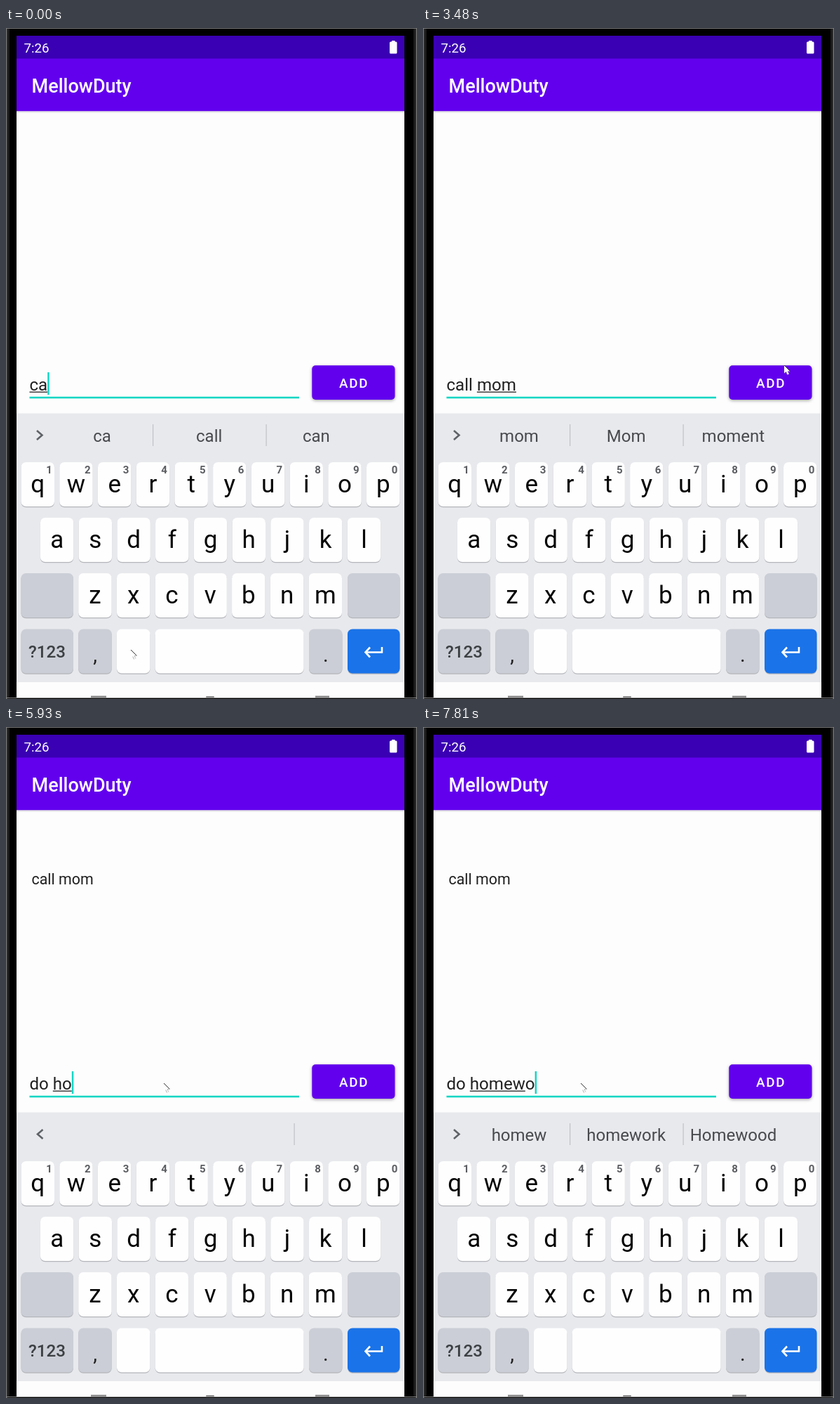
Write an HTML page with a canvas that moves like this. It is 586x955 px and loops after 8 s.

```html
<!DOCTYPE html>
<html lang="en">
<head>
<meta charset="utf-8">
<title>To-do list</title>
<style>
  html, body { margin: 0; width: 100%; height: 100%; overflow: hidden; background: #000; }
  canvas { display: block; }
</style>
</head>
<body>
<canvas id="stage" width="586" height="955"></canvas>
<script>
const ctx = document.getElementById('stage').getContext('2d');
const LOOP = 8000, BLINK = 530, CLICK = 3760, INPUT_X = 33.5;
const PURPLE = '#6200ee', TEAL = '#14d6c4', KEY = '#fefefe', GREY_KEY = '#cbced6';

// [time, text, underline start, underline end, suggestions (empty: toolbar)]
const steps = [
  [0, 'ca', 0, 2, 'ca call can'],
  [270, 'cal', 0, 2, 'ca call can'],
  [420, 'cal', 0, 3, 'cal call called'],
  [850, 'call', 0, 4, 'call Call calling'],
  [1130, 'call ', 0, 0, 'mom me brother'],
  [1280, 'call m', 0, 0, 'mom me brother'],
  [1420, 'call mo', 5, 6, 'm mom my'],
  [1550, 'call mo', 5, 7, 'mo no more'],
  [1680, 'call mom', 5, 7, 'mo no more'],
  [1960, 'call mom', 5, 8, 'mom Mom moment'],
  [3890, '', 0, 0, 'mom Mom moment'],
  [4030, '', 0, 0, ''],
  [4960, 'd', 0, 0, ''],
  [5110, 'd', 0, 1, 'd do did'],
  [5240, 'do', 0, 1, 'd do did'],
  [5380, 'do', 0, 2, "do dog don't"],
  [5520, 'do ', 0, 0, ''],
  [5650, 'do h', 0, 0, ''],
  [5780, 'do h', 3, 4, ''],
  [5930, 'do ho', 3, 5, ''],
  [6200, 'do ho', 3, 5, 'h he home'],
  [6340, 'do ho', 3, 5, 'ho go hope'],
  [6980, 'do hom', 3, 5, 'ho go hope'],
  [7260, 'do hom', 3, 6, 'hom home him'],
  [7400, 'do home', 3, 6, 'hom home him'],
  [7540, 'do home', 3, 7, 'home Home homes'],
  [7670, 'do homew', 3, 8, 'homew homework Homewood'],
  [7810, 'do homewo', 3, 8, 'homew homework Homewood']
];

// [time, x, y] of the pointer tip
const pointerPath = [
  [0, 178, 885], [2110, 178, 885], [3080, 541, 472], [3340, 515, 480],
  [3480, 509, 481.5], [3760, 509, 481.5], [4560, 225, 507], [LOOP, 225, 507]
];

function rect(x, y, w, h, color) {
  ctx.fillStyle = color;
  ctx.fillRect(x, y, w, h);
}

function round(x, y, w, h, r, color) {
  ctx.fillStyle = color;
  ctx.beginPath();
  ctx.roundRect(x, y, w, h, r);
  ctx.fill();
}

function line(points, color, width) {
  ctx.strokeStyle = color;
  ctx.lineWidth = width;
  ctx.beginPath();
  points.forEach(([x, y]) => ctx.lineTo(x, y));
  ctx.stroke();
}

function setFont(size, weight = 400) {
  ctx.font = `${weight} ${size}px Roboto, sans-serif`;
}

function text(str, x, y, size, color, align = 'left', weight = 400) {
  setFont(size, weight);
  ctx.textAlign = align;
  ctx.fillStyle = color;
  ctx.fillText(str, x, y);
}

function key(x, y, w, color, label = '', baseline = 43) {
  round(x, y + 1.2, w, 63, 7, '#b3b5ba');
  round(x, y, w, 63, 7, color);
  text(label, x + w / 2, y + baseline, 35, '#050505', 'center');
}

function drawPhone() {
  rect(0, 0, 586, 955, '#000');
  rect(0, 0, 586, 1, '#777');
  rect(0, 0, 1.5, 955, '#777');
  rect(584.5, 0, 1.5, 955, '#777');
  rect(2, 1, 3, 952, '#1c1c1c');
  rect(581, 1, 3, 952, '#1c1c1c');
  rect(15, 11, 553, 942, '#fdfdfd');
  rect(15, 11, 553, 33, '#3a00b3');
  rect(15, 43.5, 553, 75, PURPLE);
  rect(15, 118.5, 553, 1, '#c9c9cf');
  rect(15, 119.5, 553, 1.5, '#eeeef0');
  text('7:26', 25.5, 34.5, 18.7, '#fff');
  round(547, 19.5, 10.5, 17, 1.5, '#fff');
  rect(550, 18, 4.5, 2, '#fff');
  text('MellowDuty', 36.5, 91.5, 27, '#fff', 'left', 500);
  rect(121, 950.5, 22, 2.5, '#8a8a8a');
  rect(441, 950.5, 20, 2.5, '#8a8a8a');
  round(285, 951, 12, 2, 2, '#8a8a8a');
  rect(0, 953, 586, 1, '#888');
}

function drawKeyboard() {
  const pitch = 54.72, w = 47.5;
  const row = (letters, x, y) =>
    [...letters].forEach((c, i) => key(x + pitch * i, y, w, KEY, c));
  rect(15, 548.5, 553, 382.5, '#e8e9ed');
  row('qwertyuiop', 21.5, 618);
  [...'1234567890'].forEach((d, i) =>
    text(d, 61.5 + pitch * i, 634, 15, '#5a5c60', 'center', 700));
  row('asdfghjkl', 48.9, 697);
  row('zxcvbnm', 103.2, 776);
  key(21.5, 776, 74.5, GREY_KEY);
  key(487, 776, 74.5, GREY_KEY);
  key(21.5, 855.5, 74.5, GREY_KEY);
  text('?123', 58.5, 896, 24.2, '#3c4043', 'center', 500);
  key(103.2, 855.5, w, GREY_KEY);
  key(157.9, 855.5, w, KEY);
  key(212.6, 855.5, 212, KEY);
  key(432, 855.5, w, GREY_KEY);
  text(',', 127, 902, 29, '#222', 'center');
  text('.', 455.7, 902, 29, '#222', 'center');
  key(487, 855.5, 74.5, '#1a73e8');
  line([[536, 881], [536, 888.5], [513, 888.5]], '#fff', 2.6);
  line([[519, 881.5], [512.5, 888.5], [519, 895.5]], '#fff', 2.6);
}

function drawSuggestions(words) {
  const open = words !== '';
  const [back, tip] = open ? [44, 51.5] : [52.5, 45];
  line([[back, 573], [tip, 579.5], [back, 586]], '#5f6368', 2.6);
  (open ? [209, 370.5] : [410.5]).forEach(x => rect(x, 564, 1.2, 31, '#bfc1c6'));
  if (open) words.split(' ').forEach((word, i) =>
    text(word, 137 + 152.7 * i, 589, 24, '#484a4e', 'center'));
}

function drawInput(t, [, value, from, to]) {
  const edited = steps.find(step => step[1] === value)[0];
  const xAt = n => INPUT_X + ctx.measureText(value.slice(0, n)).width;
  text(value, INPUT_X, 515.5, 24.1, '#202020');
  if (to > from) rect(xAt(from), 517.5, xAt(to) - xAt(from), 1.3, '#222');
  rect(33.5, 524.7, 384.5, 2.6, TEAL);
  if (Math.floor((t - edited) / BLINK) % 2 === 0) rect(xAt(value.length), 490, 2.5, 32, TEAL);
}

function drawButton(t) {
  ctx.save();
  ctx.shadowColor = 'rgba(0,0,0,.35)';
  ctx.shadowBlur = 4;
  ctx.shadowOffsetY = 1.5;
  round(436.3, 480.3, 118.2, 48.7, 5, PURPLE);
  ctx.restore();
  const age = (t - CLICK) / 450;
  if (age >= 0 && age < 1) round(436.3, 480.3, 118.2, 48.7, 5, `rgba(255,255,255,${0.25 * (1 - age)})`);
  ctx.letterSpacing = '1.7px';
  text('ADD', 475, 512, 18.8, '#fff', 'left', 500);
  ctx.letterSpacing = '0px';
}

function drawPointer(t) {
  const tick = Math.floor((t - 2250) / 137) * 137 + 2250;
  const now = Math.max(0, tick);
  const i = Math.max(1, pointerPath.findIndex(p => p[0] > now));
  const [t0, x0, y0] = pointerPath[i - 1], [t1, x1, y1] = pointerPath[i];
  const k = (now - t0) / (t1 - t0), ease = k * k * (3 - 2 * k);
  ctx.save();
  ctx.translate(Math.round(x0 + (x1 - x0) * ease), Math.round(y0 + (y1 - y0) * ease));
  ctx.fillStyle = '#fff';
  ctx.fill(new Path2D('M0 0V11.5L2.6 9L4.6 13.5L6.6 12.6L4.7 8.2H8.2Z'));
  line([[0, 0], [8.3, 8.3]], '#333', 1);
  line([[8, 8.6], [5, 8.6], [6.8, 12.6]], '#aaa', 0.8);
  line([[2.8, 9.5], [4.5, 13.5]], '#999', 0.8);
  ctx.restore();
}

function draw(t) {
  const step = steps.findLast(s => s[0] <= t);
  drawPhone();
  drawKeyboard();
  drawSuggestions(step[4]);
  if (t >= 3890) text('call mom', 36.5, 223.5, 21.4, '#202020');
  drawInput(t, step);
  drawButton(t);
  drawPointer(t);
}

const start = performance.now();
function frame() {
  draw((performance.now() - start) % LOOP);
  requestAnimationFrame(frame);
}
frame();
</script>
</body>
</html>
```
